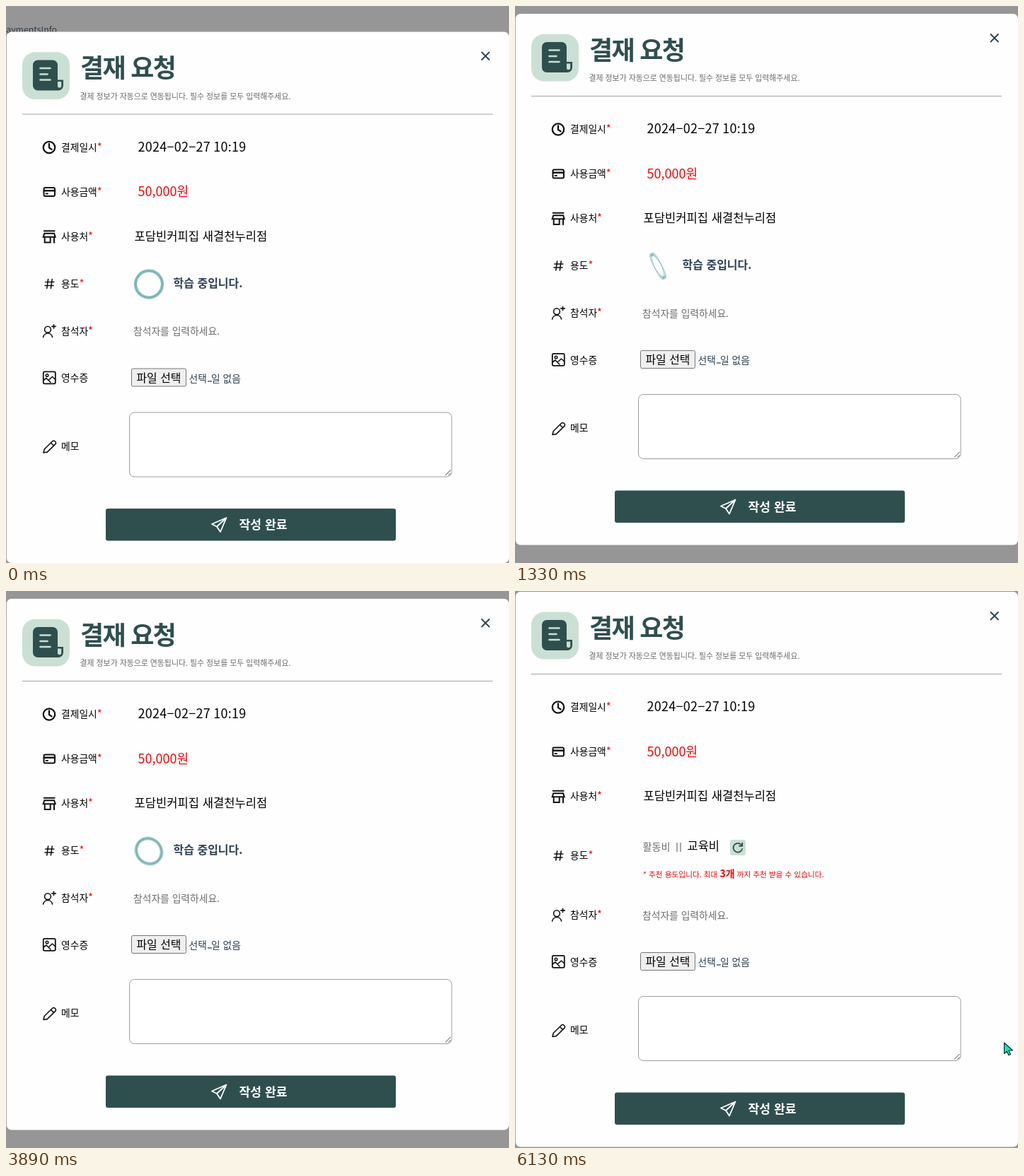
An HTML page that plays this animation: 711 by 788 pixels, repeating every 6.19 s.

```html
<!DOCTYPE html>
<html lang="ko">
<head>
<meta charset="utf-8">
<title>결재 요청</title>
<style>
  html, body { margin: 0; width: 100%; height: 100%; overflow: hidden; background: #969696; }
  #stage { position: absolute; inset: 0; width: 711px; height: 788px; overflow: hidden; }
  svg, #modal { position: absolute; left: 0; top: 0; overflow: visible; }
  text { font: 13.8px 'Noto Sans CJK KR', 'Noto Sans CJK JP', sans-serif; white-space: pre; }
  .bold { font-weight: 700; }
  .muted { fill: #6c6c6c; }
  .red { fill: #f00; }
  .mark { fill: #f00; font-size: 15px; font-weight: 500; }
  .navy { fill: #2c3e50; }
  .icon { fill: none; stroke: #111; stroke-width: 1.8; stroke-linejoin: round; stroke-linecap: round; }
  .ring {
    position: absolute; left: 181px; top: 347px; width: 42px; height: 42px;
    box-sizing: border-box; border: 4.2px solid #328f8f; border-radius: 50%; opacity: .4;
  }
</style>
</head>
<body>
<div id="stage">
  <svg width="711" height="788">
    <text x="72" y="38" text-anchor="end" style="font-size:12.3px" fill="#333b42">PaymentsInfo</text>
  </svg>

  <div id="modal">
    <svg width="711" height="800">
      <rect id="panel" x=".8" y="11" width="710.2" rx="7" fill="#fefefe"/>

      <!-- header -->
      <rect x="23" y="39.8" width="67" height="66.7" rx="18" fill="#cbe0d4"/>
      <path d="M45 51h21a7 7 0 0 1 7 7v21h8v8a7 7 0 0 1-7 7H45a7 7 0 0 1-7-7v-29a7 7 0 0 1 7-7z" fill="#2f4f4f"/>
      <path d="M73 81.500h5.200v6a2.600 2.600 0 0 1-5.200 0z" fill="#cbe0d4"/>
      <path d="M48.500 62.500h14M48.500 71h10M48.500 79h14" stroke="#cbe0d4" stroke-width="2.6" stroke-linecap="round"/>
      <text class="bold" x="105" y="75.5" style="font-size:36px;letter-spacing:-1.7px" fill="#2f4f4f">결재 요청</text>
      <text class="muted" x="104.5" y="106" style="font-size:10.9px">결제 정보가 자동으로 연동됩니다. 필수 정보를 모두 입력해주세요.</text>
      <path class="icon" d="M672.5 40l10.5 10.5M683 40l-10.5 10.5" style="stroke:#2c3e50"/>
      <path d="M23 127.5H688" stroke="#a4a4a4"/>

      <!-- fixed rows -->
      <g class="icon">
        <g style="stroke-width:2.3"><circle cx="61" cy="174.5" r="8.2"/><path d="M61 169.5v5.5l3.6 2.4"/></g>
        <rect x="53.5" y="231.5" width="15.5" height="12" rx="2" style="stroke-width:2"/>
        <path d="M54 235.8h15" style="stroke-width:2.6"/><path d="M56.5 240h2.5"/>
        <path d="M53.8 292.8h14.8M54.3 296.3h13.8l1.6 5h-17zM54.7 301.5v7.5h8v-7.5M68 301.5v7.8" style="stroke-width:2;stroke-linejoin:miter"/>
      </g>
      <text x="78" y="179">결제일시<tspan class="mark">*</tspan></text>
      <text x="186.5" y="180" style="font-size:18px;letter-spacing:.25px">2024−02−27 10:19</text>
      <text x="78" y="242">사용금액<tspan class="mark">*</tspan></text>
      <text class="red" x="186.5" y="243.5" style="font-size:18px">50,000원</text>
      <text x="78" y="305">사용처<tspan class="mark">*</tspan></text>
      <text x="181.5" y="306.2" style="font-size:16.6px">포담빈커피집 새결천누리점</text>

      <!-- purpose row -->
      <g id="purpose">
        <path class="icon" d="M59.6 361l-1.8 13M65.2 361l-1.8 13M55.8 365h12M55 370h12" style="stroke-width:1.6"/>
        <text x="78" y="372">용도<tspan class="mark">*</tspan></text>
      </g>
      <text class="bold waiting" x="236.5" y="372" style="font-size:16px" fill="#2f4058">학습 중입니다.</text>
      <g class="answer">
        <text class="muted" x="180.5" y="377" style="font-size:14.1px">활동비</text>
        <path d="M229 366v13M234 366v13" stroke="#6c6c6c" stroke-width="1.2"/>
        <text x="243.5" y="377" style="font-size:16.5px">교육비</text>
        <rect x="304" y="362" width="22" height="22" rx="3" fill="#cbe0d4"/>
        <path class="icon" d="M320.6 370.2a6.4 6.4 0 1 0 .6 4.6M321.3 366.5v4.3h-4.3" style="stroke:#2f4f4f"/>
        <text class="red" x="181" y="415" style="font-size:10.7px">* 추천 용도입니다. 최대 <tspan class="bold" style="font-size:14px">3개</tspan> 까지 추천 받을 수 있습니다.</text>
      </g>

      <!-- rows pushed down by the answer -->
      <g id="lower">
        <g class="icon">
          <path d="M52.6 443a6.6 6.6 0 0 1 13 0M67.5 425.2v5.4M64.8 427.9h5.4" style="stroke-width:1.6"/>
          <circle cx="59" cy="432.2" r="4.4" style="stroke-width:1.6"/>
          <rect x="52.8" y="491.8" width="17" height="17" rx="1.8"/>
          <circle cx="58" cy="497" r="1.8" style="stroke-width:1.5"/>
          <path d="M53 504l4-3 3 3 5.5-5 4.3 4M60 504l3 3" style="stroke-width:1.6"/>
          <path d="M53 606.5l1.2-5L65.6 590.2a2.4 2.4 0 0 1 3.4 0l.8.8a2.4 2.4 0 0 1 0 3.4L58.3 605.6zM63.5 592.5l4 4" style="stroke-width:1.6"/>
        </g>
        <text x="78" y="439.3">참석자<tspan class="mark">*</tspan></text>
        <text class="muted" x="180" y="439.5">참석자를 입력하세요.</text>
        <text x="78" y="505.5">영수증</text>
        <rect x="177.5" y="487.5" width="77" height="25" rx="2" fill="#efefef" stroke="#767676"/>
        <text x="184.5" y="506" style="font-size:15.9px">파일 선택</text>
        <text class="navy" x="258.5" y="506.2">선택<tspan style="letter-spacing:-1.8px">...</tspan>일 없음</text>
        <text x="78" y="602.3">메모</text>
        <rect x="174.5" y="549.5" width="455.5" height="91" rx="7" fill="#fff" stroke="#9c9c9c"/>
        <path d="M621 638.5l7.5-7.5M625.5 638.5l3-3" stroke="#444"/>
        <rect x="141" y="685.5" width="410" height="45.5" rx="3" fill="#2f4f4f"/>
        <path class="icon" d="M311.5 698.5l-20.500 9 7 3.500 5 7.500zL298 711" style="stroke:#fff"/>
        <text class="bold" x="329.5" y="714.5" style="font-size:17.2px" fill="#fff">작성 완료</text>
      </g>
    </svg>
    <div class="ring waiting"></div>
    <div class="ring waiting"></div>
  </div>

  <svg width="711" height="788">
    <path id="cursor" d="M0 0v15.5l3.7-3.3 2.6 5.6 2.8-1.3-2.6-5.500h5.500z" fill="#12e6b0" stroke="#123" stroke-width="1.1" stroke-linejoin="round"/>
  </svg>
</div>

<script>
const LOOP = 6190, ANSWER_AT = 4470, CURSOR_AT = 5990, GROWTH = 34;
const SPIN = 2000, SPIN_DELAY = 25;
const byId = id => document.getElementById(id);
const [panel, modal, purpose, lower, cursor] = ['panel', 'modal', 'purpose', 'lower', 'cursor'].map(byId);
const rings = document.querySelectorAll('.ring');
const waiting = document.querySelectorAll('.waiting');
const answer = document.querySelector('.answer');

const progress = (t, from, to) => Math.min(1, Math.max(0, (t - from) / (to - from)));
const smooth = u => u * u * (3 - 2 * u);
const show = (el, on) => el.style.visibility = on ? 'visible' : 'hidden';
const shift = (el, y) => el.setAttribute('transform', `translate(0 ${y})`);

function scrollOffset(t) {
  if (t < 5130) return 25.5 * (1 - smooth(progress(t, 740, 1070)));
  const rest = 1 - progress(t, 5130, 5260);
  return -10 + 5 * rest * rest;
}

function render(t) {
  const answered = t >= ANSWER_AT, growth = answered ? GROWTH : 0;
  modal.style.transform = `translateY(${scrollOffset(t)}px)`;
  panel.setAttribute('height', 751.5 + growth);
  shift(purpose, growth / 2);
  shift(lower, growth);
  waiting.forEach(el => show(el, !answered));
  show(answer, answered);

  // two rings tumble with the X and Y speeds swapped
  const turn = (t - SPIN_DELAY) / SPIN * 360;
  rings[0].style.transform = `rotateX(${turn / 2}deg) rotateY(${turn}deg) rotateZ(${turn}deg)`;
  rings[1].style.transform = `rotateX(${turn}deg) rotateY(${turn / 2}deg) rotateZ(${turn}deg)`;

  const glide = progress(t, CURSOR_AT, 6130);
  show(cursor, t >= CURSOR_AT);
  cursor.setAttribute('transform', `translate(${685 + 6.5 * glide} ${544 + 95 * glide})`);
}

const start = performance.now();
function tick() {
  render((performance.now() - start) % LOOP);
  requestAnimationFrame(tick);
}
tick();
</script>
</body>
</html>
```
